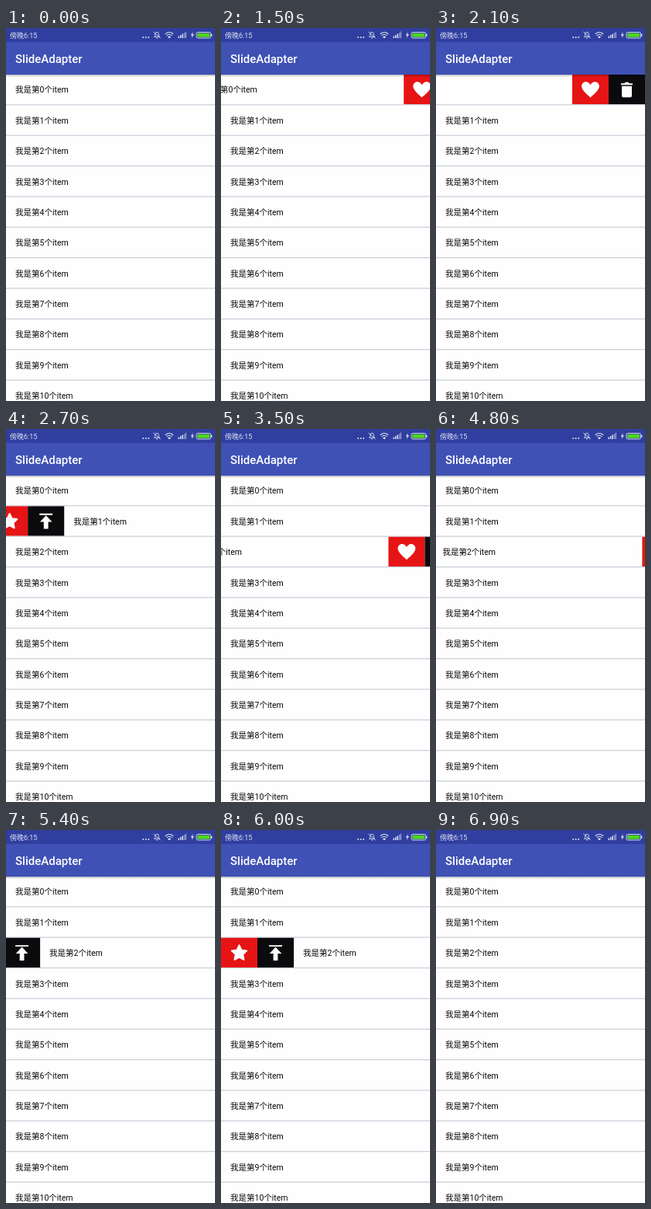
Animation, 270 px wide and 480 px high, one loop 7 s. Source, as an HTML page:

```html
<!DOCTYPE html>
<html lang="zh">
<head>
<meta charset="utf-8">
<title>SlideAdapter</title>
<style>
  html, body { margin: 0; width: 100%; height: 100%; overflow: hidden; background: #fefefe; }
  svg { display: block; width: 100vw; height: 100vh; }
  text { font-family: Roboto, "Noto Sans CJK SC", "Noto Sans CJK", sans-serif; }
  .item { font-size: 10.5px; fill: #080808; }
</style>
</head>
<body>
<svg viewBox="0 0 270 480">
  <defs>
    <linearGradient id="shade" x1="0" y1="0" x2="0" y2="1">
      <stop offset="0" stop-color="#000" stop-opacity=".28"/>
      <stop offset="1" stop-color="#000" stop-opacity="0"/>
    </linearGradient>
    <path id="heart" fill="#fff" d="M0 10.2 C-2 8 -11.4 1.500 -11.400 -4.200 C-11.400 -7.800 -8.900 -10 -5.900 -10 C-3.200 -10 -1 -8.300 0 -6 C1 -8.300 3.200 -10 5.900 -10 C8.900 -10 11.400 -7.800 11.400 -4.200 C11.400 1.500 2 8 0 10.200Z"/>
    <path id="star" fill="#fff" stroke="#fff" stroke-width="2" stroke-linejoin="round"/>
    <path id="top" fill="#fff" d="M-8.500 -9.800H8.500V-7.900H-8.500ZM0 -7.400L7.800 1H2.900V10H-2.900V1H-7.800Z"/>
    <path id="bin" fill="#fff" d="M-7.500 -8H-3L-2 -9.500H2L3 -8H7.500V-6H-7.500ZM-6.500 -4.500H6.500V8Q6.500 10 4.500 10H-4.500Q-6.500 10 -6.500 8Z"/>
  </defs>

  <rect width="270" height="480" fill="#fefefe"/>
  <g id="list"></g>
  <rect y="60" width="270" height="3" fill="url(#shade)"/>
  <rect width="270" height="60" fill="#3f51b5"/>
  <rect width="270" height="18" fill="#303f9f"/>
  <text x="12" y="45.300" font-size="15" font-weight="500" fill="#fff">SlideAdapter</text>

  <g fill="#dde1f4">
    <text x="5" y="12.700" font-size="9">傍晚6:15</text>
    <circle cx="177.200" cy="12" r="1"/>
    <circle cx="180.700" cy="12" r="1"/>
    <circle cx="184.200" cy="12" r="1"/>
    <path d="M222.500 10.500h1.500v2.500h-1.500zM225 9h1.500v4h-1.500zM227.500 7.500h1.500v5.500h-1.500z"/>
    <path d="M230 6h1.500v7h-1.500zM232 4.500h1v8.500h-1z" opacity=".6"/>
    <path d="M241.700 5L238.700 9.600H240.600L239.800 13L243 8.300H241Z"/>
  </g>
  <g fill="none" stroke="#dde1f4">
    <path d="M191.500 11.300H198.500L197.300 9.500V7.500Q197 5.300 195 5.300Q193 5.300 192.700 7.500V9.500ZM194 13H196M190.500 5L199.500 13" stroke-width=".9"/>
    <path d="M205.800 7.700Q211 3.300 216.200 7.700M207.600 9.700Q211 6.800 214.400 9.700" stroke-width="1.200"/>
    <path d="M209.400 11.500Q211 10.200 212.600 11.500L211 13Z" stroke-width=".8" fill="#dde1f4"/>
    <rect x="246" y="5.500" width="18.500" height="7.500" rx="1.800" stroke-width=".9"/>
    <path d="M265.700 7.700V10.800" stroke-width="1.200"/>
  </g>
  <rect x="247.300" y="6.800" width="15.900" height="4.900" rx=".8" fill="#4fd51f"/>
</svg>
<script>
  const LOOP = 7000, STEP = 100;
  const TOP = 60, PITCH = 39.37, CELL = 47, WIDTH = 270;
  const OPEN = 2 * CELL;
  const RED = '#e61414', BLACK = '#0b0b0d';

  // row, start, duration, end offset, ease-out power
  const moves = [
    [0, 1400, 700, -OPEN, 2.9],
    [0, 2200, 400, 0, 2.5],
    [1, 2200, 800, OPEN, 1.64],
    [1, 3200, 300, 0, 2.5],
    [2, 3200, 800, -OPEN, 1.8],
    [2, 4300, 700, 0, 2.6],
    [2, 5200, 800, OPEN, 2.2],
    [2, 6300, 600, 0, 2]
  ];

  const starPoints = Array.from({ length: 10 }, (_, i) => {
    const r = i % 2 ? 5 : 10.2, a = (i / 5 - 0.5) * Math.PI;
    return [r * Math.cos(a), r * Math.sin(a) + 0.6].map(v => v.toFixed(2)).join(' ');
  });
  document.getElementById('star').setAttribute('d', 'M' + starPoints.join('L') + 'Z');

  const cell = (x, color, icon) =>
    `<rect x="${x}" width="${CELL}" height="${PITCH - 1}" fill="${color}"/>` +
    `<use href="#${icon}" x="${x + CELL / 2}" y="19.2"/>`;

  const menus = cell(-OPEN, RED, 'star') + cell(-CELL, BLACK, 'top') +
    cell(WIDTH, RED, 'heart') + cell(WIDTH + CELL, BLACK, 'bin');

  const row = i =>
    `<g transform="translate(0 ${TOP + i * PITCH})">` +
    `<g class="slide">${i < 3 ? menus : ''}<text class="item" x="12" y="23.4">我是第${i}个item</text></g>` +
    `<rect y="${PITCH - 1.2}" width="${WIDTH}" height="1.2" fill="#cbccd8"/></g>`;

  const list = document.getElementById('list');
  list.innerHTML = Array.from({ length: 11 }, (_, i) => row(i)).join('');
  const slides = [...list.querySelectorAll('.slide')].slice(0, 3);

  function offset(index, t) {
    let x = 0;
    for (const [r, start, span, end, power] of moves) {
      if (r !== index || t < start) continue;
      const u = Math.min(1, (t - start) / span);
      x += (end - x) * (1 - (1 - u) ** power);
    }
    return x;
  }

  function draw(t) {
    slides.forEach((s, i) => s.setAttribute('transform', `translate(${offset(i, t).toFixed(2)} 0)`));
  }

  function tick() {
    const t = performance.now() % LOOP;
    draw(Math.floor(t / STEP) * STEP);
    requestAnimationFrame(tick);
  }
  tick();
</script>
</body>
</html>
```
